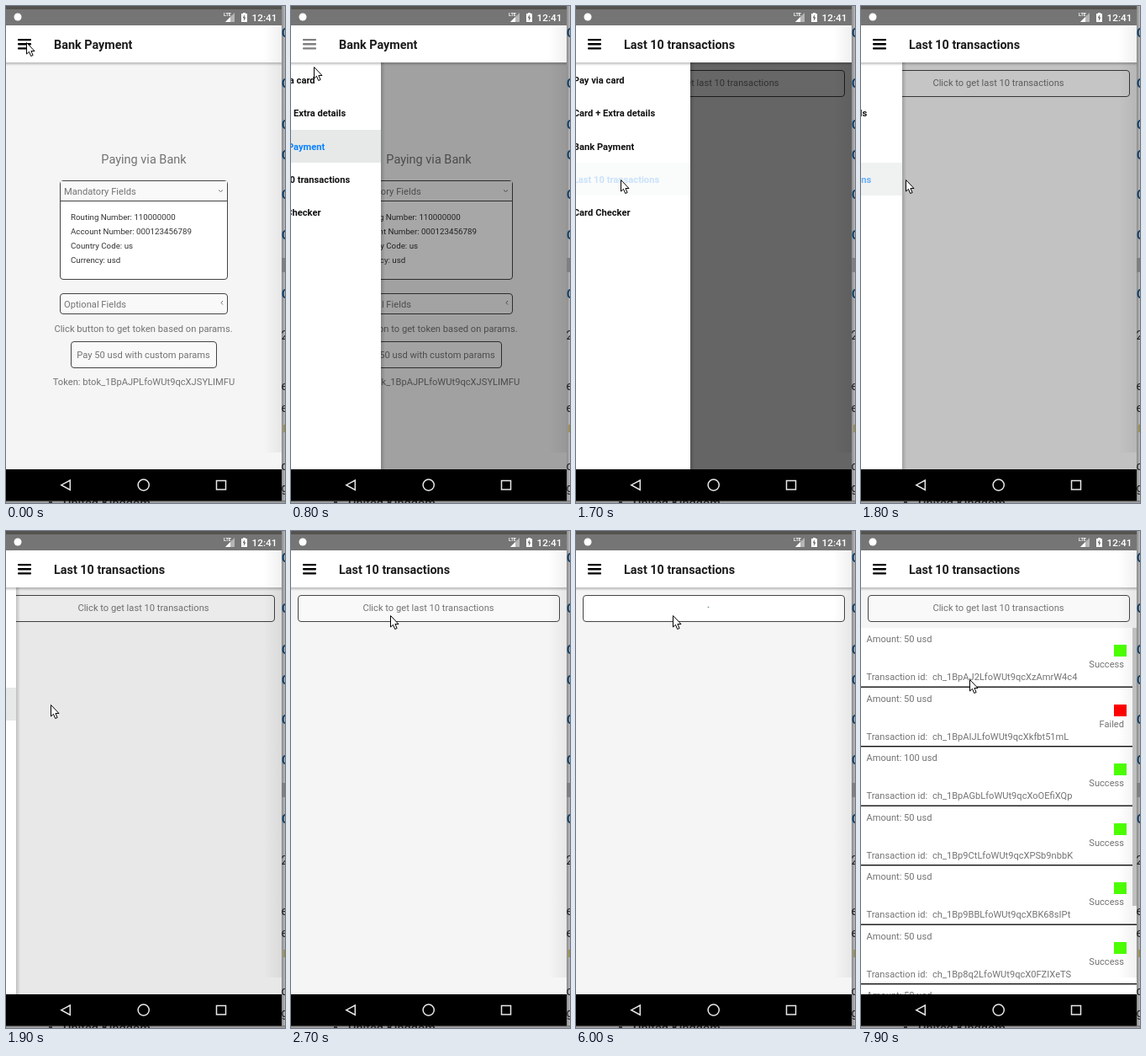
An HTML page with a canvas that plays this animation: 332x590 px, repeating every 8 s.

```html
<!DOCTYPE html>
<html lang="en">
<head>
<meta charset="utf-8">
<title>Payment app</title>
<style>
html, body { margin: 0; width: 100%; height: 100%; overflow: hidden; background: #000; }
canvas { display: block; width: 332px; height: 590px; }
</style>
</head>
<body>
<canvas id="stage"></canvas>
<script>
const W = 332, H = 590, LOOP = 8000, STEP = 100;
const APP_W = 328, HEAD_Y = 23, BODY_Y = 67, NAV_Y = 550;
const DRAWER_W = 152, GREY = '#737373';
const canvas = document.getElementById('stage');
const dpr = window.devicePixelRatio || 1;
canvas.width = W * dpr;
canvas.height = H * dpr;
const c = canvas.getContext('2d');

function rect(x, y, w, h, fill) {
  c.fillStyle = fill;
  c.fillRect(x, y, w, h);
}

function text(str, x, y, size, fill, { align = 'left', weight = 400 } = {}) {
  c.font = `${weight} ${size}px Roboto, sans-serif`;
  c.textAlign = align;
  c.fillStyle = fill;
  c.fillText(str, x, y);
}

function box(x, y, w, h, fill) {
  c.beginPath();
  c.roundRect(x + .5, y + .5, w - 1, h - 1, 3.5);
  c.fillStyle = fill;
  c.fill();
  c.strokeStyle = '#444';
  c.lineWidth = 1;
  c.stroke();
}

function path(points, { fill, stroke, width = 1, close = false }) {
  c.beginPath();
  points.forEach(([x, y]) => c.lineTo(x, y));
  if (close) c.closePath();
  if (fill) { c.fillStyle = fill; c.fill(); }
  if (stroke) { c.strokeStyle = stroke; c.lineWidth = width; c.stroke(); }
}

function fade(x0, y0, x1, y1, from, to) {
  const g = c.createLinearGradient(x0, y0, x1, y1);
  g.addColorStop(0, from);
  g.addColorStop(1, to);
  return g;
}

function clipped(x, y, w, h, draw) {
  c.save();
  c.beginPath();
  c.rect(x, y, w, h);
  c.clip();
  draw();
  c.restore();
}

// Critically damped spring, 0 to 1
function spring(ms) {
  const x = .018 * Math.max(0, ms);
  return 1 - (1 + x) * Math.exp(-x);
}

// Material standard curve, cubic-bezier(.4, 0, .2, 1)
function standardEase(x) {
  if (x <= 0) return 0;
  if (x >= 1) return 1;
  let lo = 0, hi = 1, u = .5;
  for (let i = 0; i < 20; i++) {
    u = (lo + hi) / 2;
    const at = 1.2 * (1 - u) ** 2 * u + .6 * (1 - u) * u * u + u ** 3;
    if (at < x) lo = u; else hi = u;
  }
  return 3 * (1 - u) * u * u + u ** 3;
}

function track(keys, t) {
  let i = keys.findIndex(k => k[0] > t);
  if (i < 0) return keys[keys.length - 1].slice(1);
  i = Math.max(i, 1);
  const a = keys[i - 1], b = keys[i], u = (t - a[0]) / (b[0] - a[0]);
  return a.slice(1).map((v, n) => v + (b[n + 1] - v) * u);
}

const cursorKeys = [
  [0, 24, 43], [100, 23, 43], [600, 23, 43], [700, 24, 49],
  [800, 27, 72], [1300, 53, 206], [1900, 53, 206], [2300, 118, 98],
  [2500, 118, 98], [2700, 118, 100], [4200, 118, 100], [5100, 116, 100],
  [6000, 115, 100], [6500, 113, 100], [7700, 113, 100], [7900, 129, 176]
];
const menuKeys = [[0, 1], [500, 1], [600, .3], [700, .3], [800, .5], [900, .8], [1000, 1]];
const itemKeys = [[0, 1], [1300, 1], [1400, .2], [1700, .2], [1800, .6], [1900, 1]];

function backdrop() {
  rect(0, 0, W, H, '#b2b2b2');
  rect(APP_W, 0, 4, H, fade(APP_W, 0, W, 0, '#888', '#bcbcbc'));
  rect(0, 587, W, 3, fade(0, 587, 0, 590, '#777', '#aaa'));
  clipped(APP_W, 0, 4, H, () => {
    rect(APP_W, 299, 4, 17, '#808080');
    [32, 92, 141, 177, 224, 272, 342]
      .forEach(y => text('C', 328, y + 5, 14, '#123f66', { weight: 700 }));
    [['2', 391], ['e', 451], ['e', 477], ['c', 546], ['g', 572]]
      .forEach(([s, y]) => text(s, 327.5, y + 5, 14, '#222'));
    rect(330, 497, 2, 9, '#9c9150');
  });
  clipped(0, 587, W, 3, () => {
    text('United Kingdom', 68, 595, 14.5, '#222', { weight: 500 });
    rect(51, 588, 4, 2, '#333');
  });
}

function statusBar() {
  rect(0, 0, APP_W, HEAD_Y, '#757575');
  rect(0, 0, APP_W, 4, '#55534f');
  c.fillStyle = '#fff';
  c.beginPath();
  c.arc(14, 13, 4.5, 0, 7);
  c.fill();
  text('LTE', 259, 12, 5.5, '#fff', { weight: 700 });
  path([[272, 8], [272, 19], [261, 19]], { fill: '#b5b5b5', close: true });
  path([[267, 13], [267, 19], [261, 19]], { fill: '#fff', close: true });
  rect(280, 9, 7, 10, '#fff');
  rect(282, 8, 3, 1, '#fff');
  path([[284.2, 10], [281.6, 14.3], [283.2, 14.3], [282.8, 18], [285.4, 13.4], [283.8, 13.4]],
    { fill: '#666', close: true });
  text('12:41', 292.5, 18, 11.8, '#fff', { weight: 500 });
}

function header(title, menuAlpha) {
  rect(0, BODY_Y, APP_W, 4, fade(0, BODY_Y, 0, BODY_Y + 4, 'rgba(0,0,0,.25)', 'rgba(0,0,0,0)'));
  rect(0, HEAD_Y, APP_W, BODY_Y - HEAD_Y, '#fff');
  c.globalAlpha = menuAlpha;
  for (let i = 0; i < 3; i++) {
    c.beginPath();
    c.roundRect(14, 39 + i * 5.1, 16, 2.3, .8);
    c.fillStyle = '#000';
    c.fill();
  }
  c.globalAlpha = 1;
  text(title, 57, 51, 14.4, '#1b1b1b', { weight: 700 });
}

function navBar() {
  rect(0, NAV_Y, APP_W, 37.5, '#000');
  const line = { stroke: '#e8e8e8', width: 1.5, close: true };
  path([[76.3, 563], [76.3, 574.5], [65.8, 568.7]], line);
  c.beginPath();
  c.arc(163.7, 568.6, 6.6, 0, 7);
  c.stroke();
  path([[250.5, 563.5], [261.5, 563.5], [261.5, 574], [250.5, 574]], line);
}

function bankScreen() {
  const mid = { align: 'center' };
  text('Paying via Bank', 164, 187, 14.5, GREY, mid);
  box(64, 207, 200, 118, '#fff');
  rect(65, 208, 198, 23, '#f9f9f9');
  rect(64, 231, 200, 1, '#444');
  text('Mandatory Fields', 69, 224, 11.17, GREY);
  path([[253, 218.5], [255.5, 220.5], [258, 218.5]], { stroke: GREY });
  ['Routing Number: 110000000', 'Account Number: 000123456789', 'Country Code: us', 'Currency: usd']
    .forEach((s, i) => text(s, 77, 254.3 + i * 17, 9.75, '#333'));
  box(64, 341, 200, 25, '#f9f9f9');
  text('Optional Fields', 69, 358, 11.17, GREY);
  path([[258, 350], [256, 352.3], [258, 354.5]], { stroke: GREY });
  text('Click button to get token based on params.', 163.5, 386.5, 11.17, GREY, mid);
  box(77, 398, 174, 32, '#f9f9f9');
  text('Pay 50 usd with custom params', 163.5, 418, 11.17, GREY, mid);
  text('Token: btok_1BpAJPLfoWUt9qcXJSYLIMFU', 164, 450, 11.17, GREY, mid);
}

function spinner(t) {
  const cycles = (t - 6093) / 1333.3;
  const phase = cycles - Math.floor(cycles);
  const turn = 191 + (t - 6000) * .108 + 90 * phase;
  const from = turn + 270 * standardEase(phase * 2 - 1);
  const to = turn + 270 * standardEase(phase * 2);
  const rad = Math.PI / 180;
  c.beginPath();
  c.arc(163.7, 91, 6.2, from * rad, Math.max(to, from + 8) * rad);
  c.strokeStyle = to - from < 15 ? '#35605f' : '#129a9a';
  c.lineWidth = 1.6;
  c.stroke();
}

const payments = [
  [50, 'AJ2LfoWUt9qcXzAmrW4c4'], [50, 'AIJLfoWUt9qcXkfbt51mL', true],
  [100, 'AGbLfoWUt9qcXoOEfiXQp'], [50, '9CtLfoWUt9qcXPSb9nbbK'],
  [50, '9BBLfoWUt9qcXBK68sIPt'], [50, '8q2LfoWUt9qcX0FZIXeTS'], [50, '']
];

function paymentList() {
  rect(0, 115, APP_W, NAV_Y - 115, '#fff');
  payments.forEach(([amount, id, failed], i) => {
    const y = 115 + i * 70.5;
    text(`Amount: ${amount} usd`, 6.5, y + 17, 11.1, GREY);
    rect(301, Math.round(y + 20), 15, 14, failed ? '#f00' : '#4cff00');
    text(failed ? 'Failed' : 'Success', 313, y + 47, 11.1, GREY, { align: 'right' });
    text('Transaction id:', 6.5, y + 62, 11.1, GREY);
    text('ch_1Bp' + id, 85, y + 62, 11.1, GREY);
    rect(0, y + 69.5, APP_W, 1.4, '#111');
  });
  rect(323, 115, 5, 330, '#c9c9c9');
}

function transactionsScreen(t) {
  const loading = t >= 3600 && t < 6300;
  c.globalAlpha = t >= 3400 && t < 3600 ? .4 : 1;
  box(8, 76, 312, 32, loading ? '#fff' : '#f9f9f9');
  if (loading) spinner(t);
  else text('Click to get last 10 transactions', 163.5, 95, 11.17, GREY, { align: 'center' });
  c.globalAlpha = 1;
  if (t >= 6300) paymentList();
}

const items = ['Pay via card', 'Card + Extra details', 'Bank Payment', 'Last 10 transactions', 'Card Checker'];

function drawer(t, switched) {
  const shown = switched ? 1 - spring(t - 1670) : spring(t - 663);
  const edge = Math.round(shown * DRAWER_W);
  if (edge < 1) return;
  const dim = .65 * (switched ? shown : shown ** 1.8);
  rect(0, BODY_Y, APP_W, NAV_Y - BODY_Y, `rgba(0,0,0,${dim})`);
  rect(edge, BODY_Y, 5, NAV_Y - BODY_Y, fade(edge, 0, edge + 5, 0, 'rgba(0,0,0,.18)', 'rgba(0,0,0,0)'));
  const left = edge - DRAWER_W;
  rect(left, BODY_Y, DRAWER_W, NAV_Y - BODY_Y, '#fff');
  const active = switched ? 3 : 2;
  items.forEach((name, i) => {
    const y = 88 + i * 39.4;
    c.globalAlpha = i === 3 ? track(itemKeys, t)[0] : 1;
    if (i === active) rect(left, Math.round(y - 20), DRAWER_W, 39, '#e7e9e9');
    text(name, left + 12.8, y + 3.8, 11.17, i === active ? '#0a82ff' : '#111', { weight: 700 });
    c.globalAlpha = 1;
  });
}

function cursor(x, y) {
  const shape = [[0, 0], [0, 13.5], [3, 10.8], [5.2, 16], [7.6, 15], [5.4, 10], [9.5, 10]];
  const left = Math.round(x) + .5, top = Math.round(y) + .5;
  path(shape.map(([dx, dy]) => [left + dx, top + dy]),
    { fill: '#fff', stroke: '#000', close: true });
}

function draw(t) {
  c.setTransform(dpr, 0, 0, dpr, 0, 0);
  const switched = t >= 1700;
  backdrop();
  rect(0, BODY_Y, APP_W, NAV_Y - BODY_Y, '#f5f5f5');
  clipped(0, BODY_Y, APP_W, NAV_Y - BODY_Y, () => {
    if (switched) transactionsScreen(t); else bankScreen();
    drawer(t, switched);
  });
  header(switched ? 'Last 10 transactions' : 'Bank Payment', track(menuKeys, t)[0]);
  rect(306, HEAD_Y, 22, 507, fade(306, 0, APP_W, 0, 'rgba(0,0,0,0)', 'rgba(0,0,0,.06)'));
  statusBar();
  navBar();
  cursor(...track(cursorKeys, t));
}

// The screen updates ten times a second
function tick() {
  draw(Math.floor(performance.now() % LOOP / STEP) * STEP);
  requestAnimationFrame(tick);
}
tick();
</script>
</body>
</html>
```
